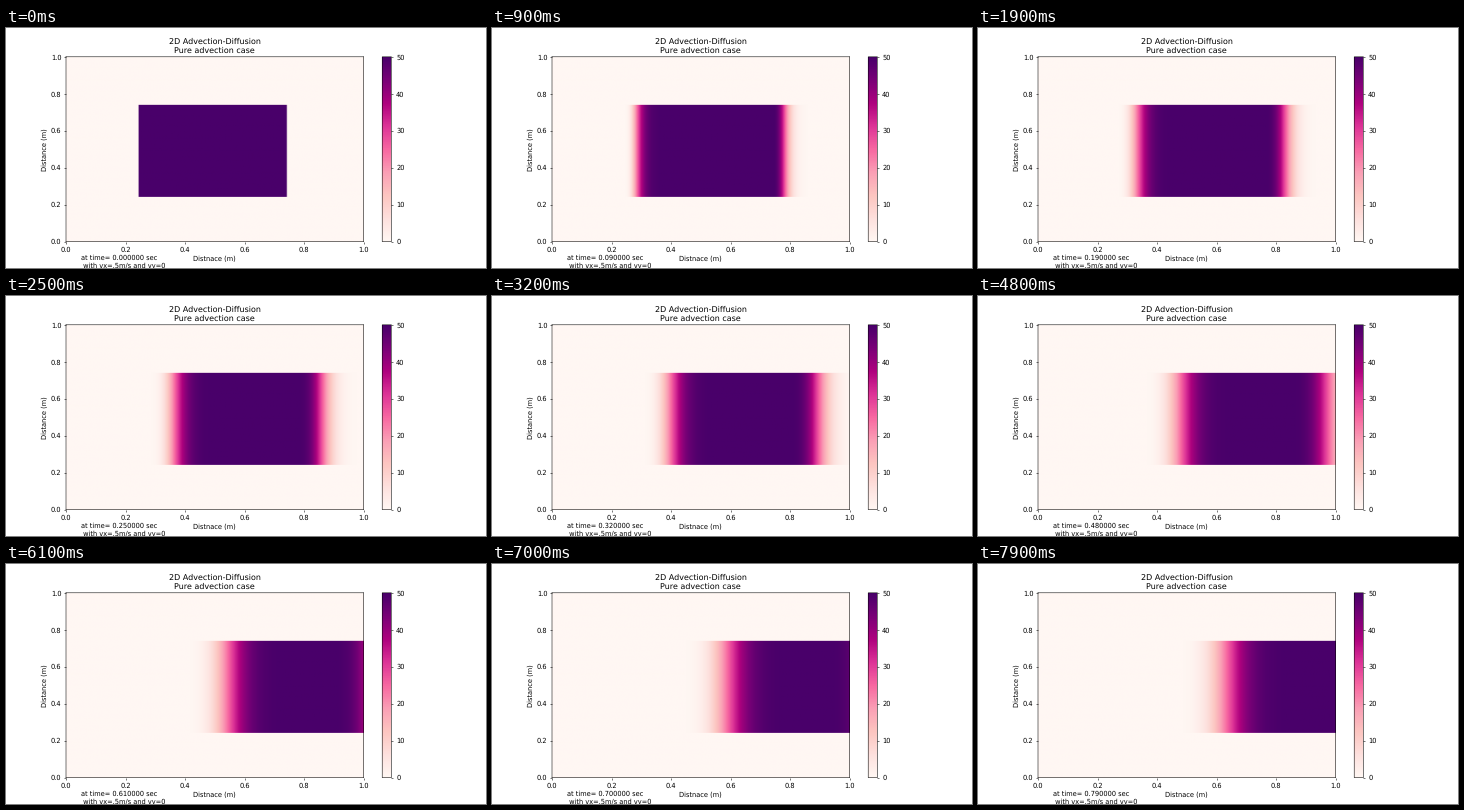
A matplotlib script for the animation above (8 s loop, 480 by 240 pixels).

```python
import numpy as np
import matplotlib.pyplot as plt
from matplotlib.animation import FuncAnimation

N_FRAMES = 80
INTERVAL = 100          # ms
VX = 0.5                # m/s
DX = 0.005              # m
DT = 0.01               # s
PEAK = 50.0

# Soft, unsnapped lines and text suit the low resolution.
plt.rcParams.update({
    "font.family": "DejaVu Sans",
    "text.hinting": "none",
    "path.snap": False,
})

nodes = np.linspace(0, 1, 201)
band = (nodes > 0.2425) & (nodes < 0.7425)


def solve():
    """Implicit upwind profile along x for every time step."""
    courant = VX * DT / DX
    u = PEAK * band
    profiles = [u]
    for _ in range(N_FRAMES - 1):
        u = u.copy()
        left = 0.0
        for i, value in enumerate(u):
            left = u[i] = (value + courant * left) / (1 + courant)
        profiles.append(u)
    return profiles


def caption(step):
    return f"at time= {step * DT:f} sec\n with vx=.5m/s and vy=0"


profiles = solve()

fig, ax = plt.subplots(figsize=(10, 5), dpi=48)
image = ax.imshow(np.outer(band, profiles[0]), cmap="RdPu", vmin=0, vmax=PEAK,
                  origin="lower", extent=(0, 1, 0, 1), aspect="auto",
                  interpolation="bilinear", interpolation_stage="rgba")
fig.colorbar(image, ax=ax)
ax.set(xlabel="Distnace (m)", ylabel="Distance (m)",
       title="2D Advection-Diffusion\nPure advection case")
label = ax.text(0.05, -0.14, caption(0))


def draw(step):
    image.set_data(np.outer(band, profiles[step]))
    label.set_text(caption(step))
    return image, label


anim = FuncAnimation(fig, draw, frames=N_FRAMES, interval=INTERVAL,
                     repeat=True, repeat_delay=0)
plt.show()
```
